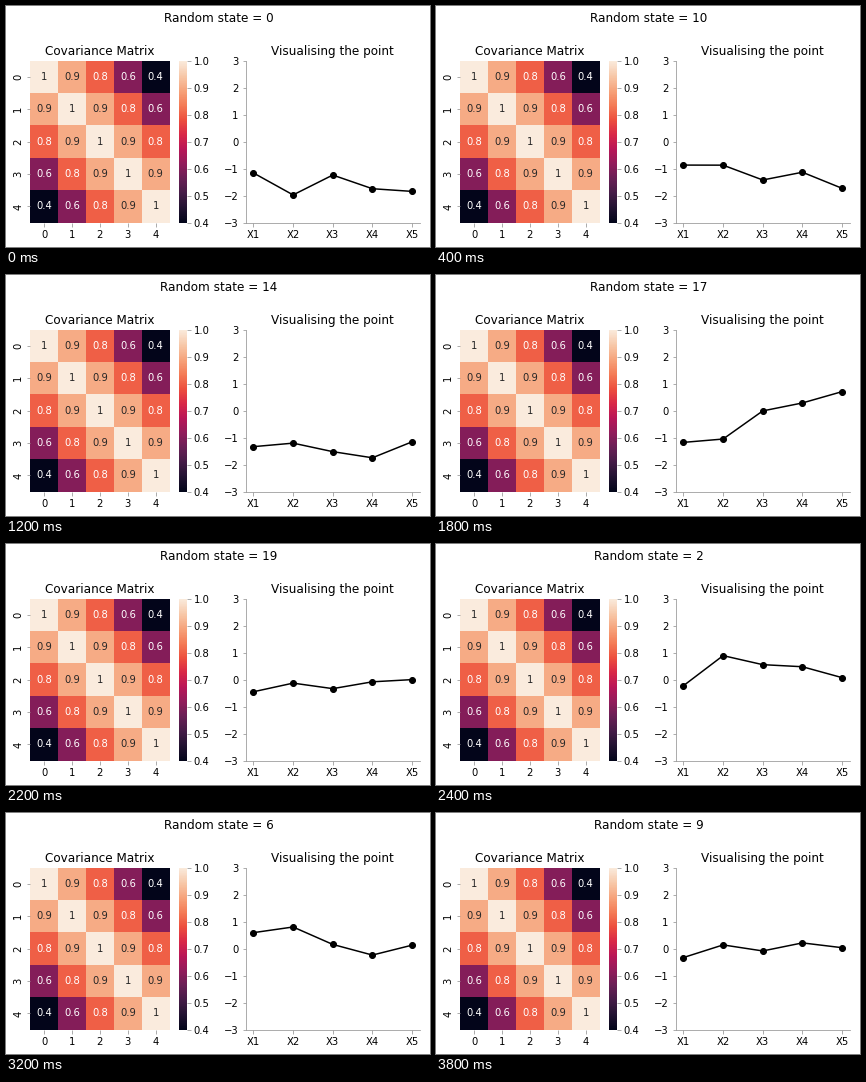
Recreate the animation shown at these times as a matplotlib script. Size 424 px wide and 241 px high, loop 4000 ms.

```python
import numpy as np
import matplotlib.pyplot as plt
from matplotlib.animation import FuncAnimation
from matplotlib.colors import LinearSegmentedColormap

W, H, DPI = 424, 241, 72
LINE = "0.6"
plt.rcParams.update({
    "font.family": "DejaVu Sans", "font.size": 10, "axes.edgecolor": LINE,
    "xtick.color": LINE, "ytick.color": LINE,
    "xtick.labelcolor": "k", "ytick.labelcolor": "k",
})

# Dark-to-cream colour map, evenly spaced stops
STOPS = ("#03051a #221331 #451c47 #691f55 #921c5b #b91657 "
         "#d92847 #ed503e #f47d57 #f6a47c #f7c9aa #faebdd").split()
CMAP = LinearSegmentedColormap.from_list("heat", STOPS, N=256)

DECAY = np.array([1, 0.9, 0.8, 0.6, 0.4])
N = len(DECAY)
COV = DECAY[np.abs(np.subtract.outer(np.arange(N), np.arange(N)))]
STATES = sorted(range(20), key=str)


def sample(seed):
    rng = np.random.RandomState(seed)
    return rng.multivariate_normal(np.zeros(N), COV, check_valid="ignore")


def add_axes(x0, x1, top=54.6, bottom=216.6):
    return fig.add_axes([x0 / W, 1 - bottom / H, (x1 - x0) / W, (bottom - top) / H])


def draw_heatmap():
    ax = add_axes(24.1, 163.7)
    mesh = ax.pcolormesh(COV, cmap=CMAP, vmin=0.4, vmax=1)
    ax.invert_yaxis()
    ax.set_title("Covariance Matrix")
    mid = np.arange(N) + 0.5
    ax.set_xticks(mid, range(N))
    ax.set_yticks(mid, range(N), rotation=90, va="center")
    ax.spines[:].set_visible(False)
    for (i, j), v in np.ndenumerate(COV):
        ax.text(j + 0.5, i + 0.5, f"{v:.2g}", ha="center", va="center",
                color="0.15" if v > 0.85 else "w")
    bar = fig.colorbar(mesh, cax=add_axes(172.6, 180.7))
    bar.outline.set_visible(False)


def draw_point():
    ax = add_axes(239.5, 414)
    ax.set_title("Visualising the point")
    line, = ax.plot([f"X{i + 1}" for i in range(N)], np.zeros(N), "ko-")
    ax.set_ylim(-3, 3)
    ax.set_yticks(range(-3, 4))
    ax.spines[["top", "right"]].set_visible(False)
    return line


fig = plt.figure(figsize=(W / DPI, H / DPI), dpi=DPI, facecolor="w")
draw_heatmap()
line = draw_point()
title = fig.suptitle("", x=212.8 / W, y=1 - 6.5 / H, fontsize=12)


def update(i):
    seed = STATES[i]
    title.set_text(f"Random state = {seed}")
    line.set_ydata(sample(seed))
    return line, title


anim = FuncAnimation(fig, update, frames=len(STATES), interval=200,
                     repeat=True, repeat_delay=0)
plt.show()
```
